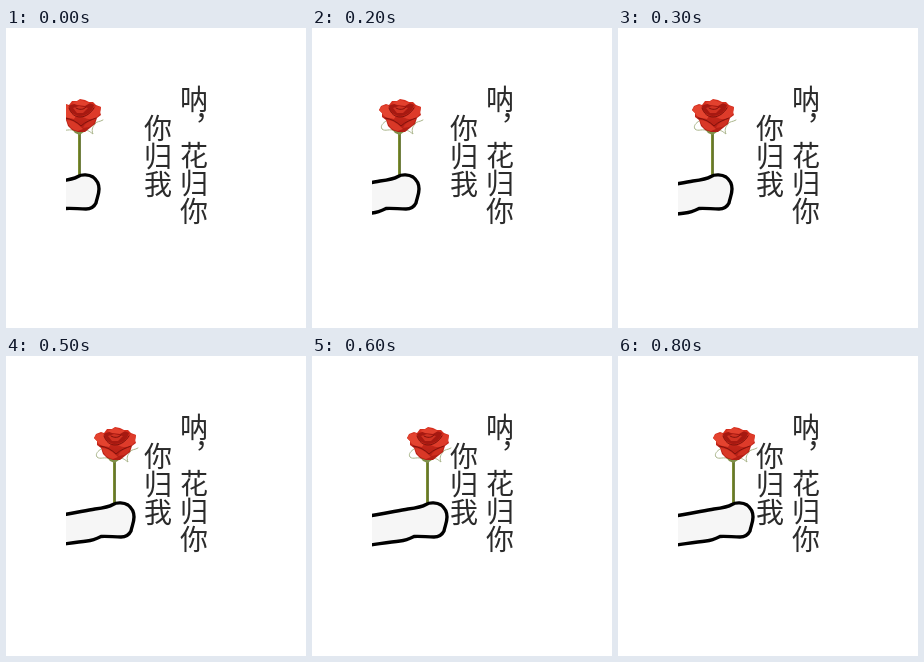
Recreate the animation shown at these times as an HTML page without scripts. Size 300 px wide and 300 px high, loop 0.9 s.

```html
<!DOCTYPE html>
<html lang="zh-CN">
<head>
<meta charset="utf-8">
<title>花归你</title>
<style>
  html, body { margin: 0; width: 100%; height: 100%; overflow: hidden; background: #fff; }
  svg { position: absolute; left: 0; top: 0; }
  .line {
    position: absolute;
    margin: 0;
    writing-mode: vertical-rl;
    white-space: nowrap;
    font: 400 28px/28px "Noto Sans CJK SC", "Noto Sans CJK", sans-serif;
    color: #2b2b2b;
  }
  .first { left: 174px; top: 57px; }
  .second { left: 138px; top: 86px; }

  /* the hand slides in by even jumps, then rests */
  .offer { animation: offer 900ms infinite; }
  @keyframes offer {
    0% { transform: translateX(-42px); animation-timing-function: steps(6, end); }
    66.667%, 100% { transform: none; }
  }
</style>
</head>
<body>
<svg width="300" height="300" viewBox="0 0 300 300">
  <defs>
    <clipPath id="sleeve"><rect x="60" y="60" width="90" height="140"/></clipPath>
    <linearGradient id="stem">
      <stop offset="0" stop-color="#8a9a3c"/>
      <stop offset="1" stop-color="#4a5c12"/>
    </linearGradient>
    <linearGradient id="bloom" x2="0" y2="1">
      <stop offset="0" stop-color="#d8301f"/>
      <stop offset="1" stop-color="#b01d14"/>
    </linearGradient>
  </defs>
  <g clip-path="url(#sleeve)">
    <g class="offer">
      <rect x="114" y="101" width="2.8" height="49" fill="url(#stem)"/>
      <!-- sepals -->
      <g fill="none" stroke="#a9b48a" stroke-linecap="round">
        <path d="M111 103C106 100 101 104 98 101C96 98 99 95 102 93"/>
        <path d="M119 103C124 101 126 104 129 106C127 101 129 98 132 95"/>
        <path d="M130 96C133 93 136 94 139 92"/>
      </g>
      <path fill="#7f8f4a" d="M107 100L111 105L115.500 107L120 104L124 100Z"/>
      <!-- petals -->
      <path fill="url(#bloom)" d="M95 82L97 78L102 76L105 77L108 73L113 73L116 71L121 72L125 74L129 74L132 77L137 79L136 84L137 87L133 90L131 96L126 100L121 104L114 104L108 102L104 98L102 92L98 89L98 85Z"/>
      <path fill="#e4432f" d="M95 82L98 78L104 77C106 81 106 85 112 88L110 91C104 90 99 89 98 85Z"/>
      <path fill="#de3b2a" d="M137 79L136 86L132 90C127 92 122 91 119 89C125 87 129 82 132 78Z"/>
      <path fill="#a61911" d="M105 78C110 75 124 73 130 77C128 84 122 88 115 88C110 87 106 84 105 78Z"/>
      <path fill="#e2412e" d="M108 75L116 72L126 75L121 78L113 77Z"/>
      <path fill="#d03222" d="M109 80L115 78L124 80L119 85L113 85Z"/>
      <path fill="#d93827" d="M103 92C109 92 114 96 119 101L114 103C108 102 104 98 103 92Z"/>
      <path fill="#cf2f20" d="M131 91C125 93 121 95 119 100L125 99C129 97 131 95 131 91Z"/>
      <g fill="none" stroke="#80120c" stroke-linecap="round">
        <path d="M105 80C107 86 111 89 116 89C122 89 127 85 130 80"/>
        <path d="M112 80C115 82 120 82 122 79"/>
        <path d="M101 90C108 91 113 94 117 98C121 94 127 92 132 90"/>
      </g>
      <!-- arm -->
      <path fill="#f6f6f6" stroke="#000" stroke-width="3.4" stroke-linejoin="round"
        d="M50 161C70 158 84 155 96 153C104 152 110 151 114 148.500C118 146 125 146.500 129 149C133 152 135 156 135 161C135 166 133 170 132 175C130 179 127 181 122 181C115 181 108 180 102 180.500C97 183 93 184.500 88 185C77 186 66 188 50 190"/>
    </g>
  </g>
</svg>
<p class="line first">呐，花归你</p>
<p class="line second">你归我</p>
</body>
</html>
```
